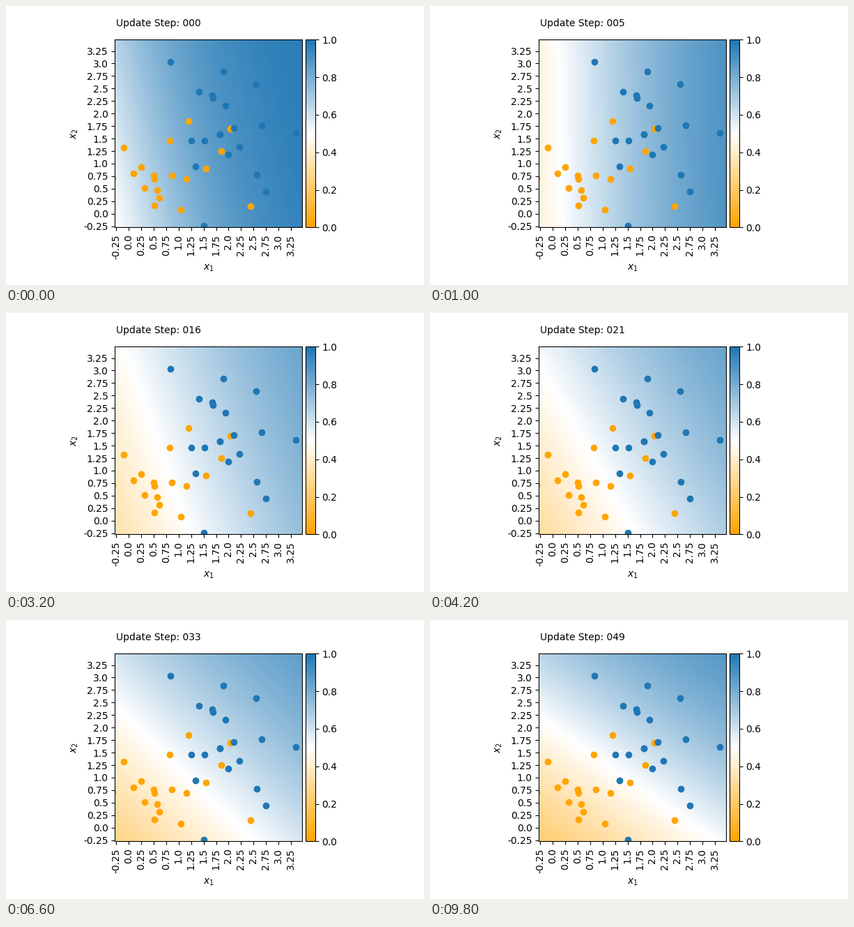
A matplotlib script that plays this animation: 600x400 px, repeating every 10000 ms.

```python
import numpy as np
import matplotlib.pyplot as plt
from matplotlib.animation import FuncAnimation
from matplotlib.colors import LinearSegmentedColormap

W, H, DPI = 600, 400, 100
STEPS, INTERVAL = 50, 200
LOW, CELL, N = -0.25, 0.05, 75
SIDE, BOTTOM = 269, 82.6
ORANGE, BLUE = "#ffa500", "#1f77b4"

# The two classes of samples, as (x1, x2)
blue_pts = np.array([
    (0.83, 3.035), (1.90, 2.84), (2.55, 2.59), (1.41, 2.44), (1.672, 2.37),
    (1.68, 2.315), (1.937, 2.16), (2.656, 1.77), (2.10, 1.715), (3.34, 1.615),
    (1.82, 1.59), (1.83, 1.59), (1.26, 1.46), (1.525, 1.455), (2.21, 1.34),
    (2.00, 1.185), (1.335, 0.946), (2.56, 0.78), (2.74, 0.446), (1.51, -0.24)])
orange_pts = np.array([
    (1.20, 1.85), (-0.093, 1.315), (0.823, 1.455), (0.255, 0.935),
    (0.10, 0.806), (0.325, 0.507), (0.50, 0.758), (0.515, 0.688),
    (0.571, 0.465), (0.607, 0.32), (0.515, 0.162), (0.87, 0.762),
    (1.16, 0.69), (1.05, 0.074), (1.552, 0.90), (1.855, 1.255),
    (2.04, 1.69), (2.445, 0.15), (-0.32, 0.705)])

grid = LOW + CELL * np.arange(N)
x1, x2 = np.meshgrid(grid, grid)


def weights(step):
    """Weights and bias of the classifier as they settle during training."""
    w1 = 0.35 + 0.45 * np.exp(-step / 10.5)
    w2 = 0.68 - 0.9 * np.exp(-step / 30) + 0.4 * np.exp(-step / 3.4)
    bias = 0.245 - 0.55 * np.log1p(step / 5.5)
    return w1, w2, bias


def predict(step):
    w1, w2, bias = weights(step)
    return 1 / (1 + np.exp(-(w1 * x1 + w2 * x2 + bias)))


def add_axes(left, width):
    return fig.add_axes([left / W, BOTTOM / H, width / W, SIDE / H])


def scatter(points, color):
    ax.scatter(*((points - LOW) / CELL).T, color=color)


fig = plt.figure(figsize=(W / DPI, H / DPI), dpi=DPI)
ax = add_axes(156.3, SIDE)
cax = add_axes(430.3, 0.05 * SIDE)

cmap = LinearSegmentedColormap.from_list("classes", [ORANGE, "white", BLUE])
image = ax.imshow(predict(0), cmap=cmap, vmin=0, vmax=1, origin="lower",
                  aspect="auto", interpolation="nearest")
scatter(orange_pts, ORANGE)
scatter(blue_pts, BLUE)

ticks = np.arange(0, N, 5)
labels = [str(round(LOW + CELL * k, 2)) for k in ticks]
ax.set_xticks(ticks, labels, rotation=90)
ax.set_yticks(ticks, labels)
ax.set_xlim(-0.5, N - 0.5)
ax.set_ylim(-0.5, N - 0.5)
ax.set_xlabel("$x_1$")
ax.set_ylabel("$x_2$")
title = ax.text(0, 80, "")
fig.colorbar(image, cax=cax)


def update(step):
    image.set_data(predict(step))
    title.set_text(f"Update Step: {step:03d}")
    return image, title


anim = FuncAnimation(fig, update, frames=STEPS, interval=INTERVAL,
                     repeat=True, repeat_delay=0)
plt.show()
```
